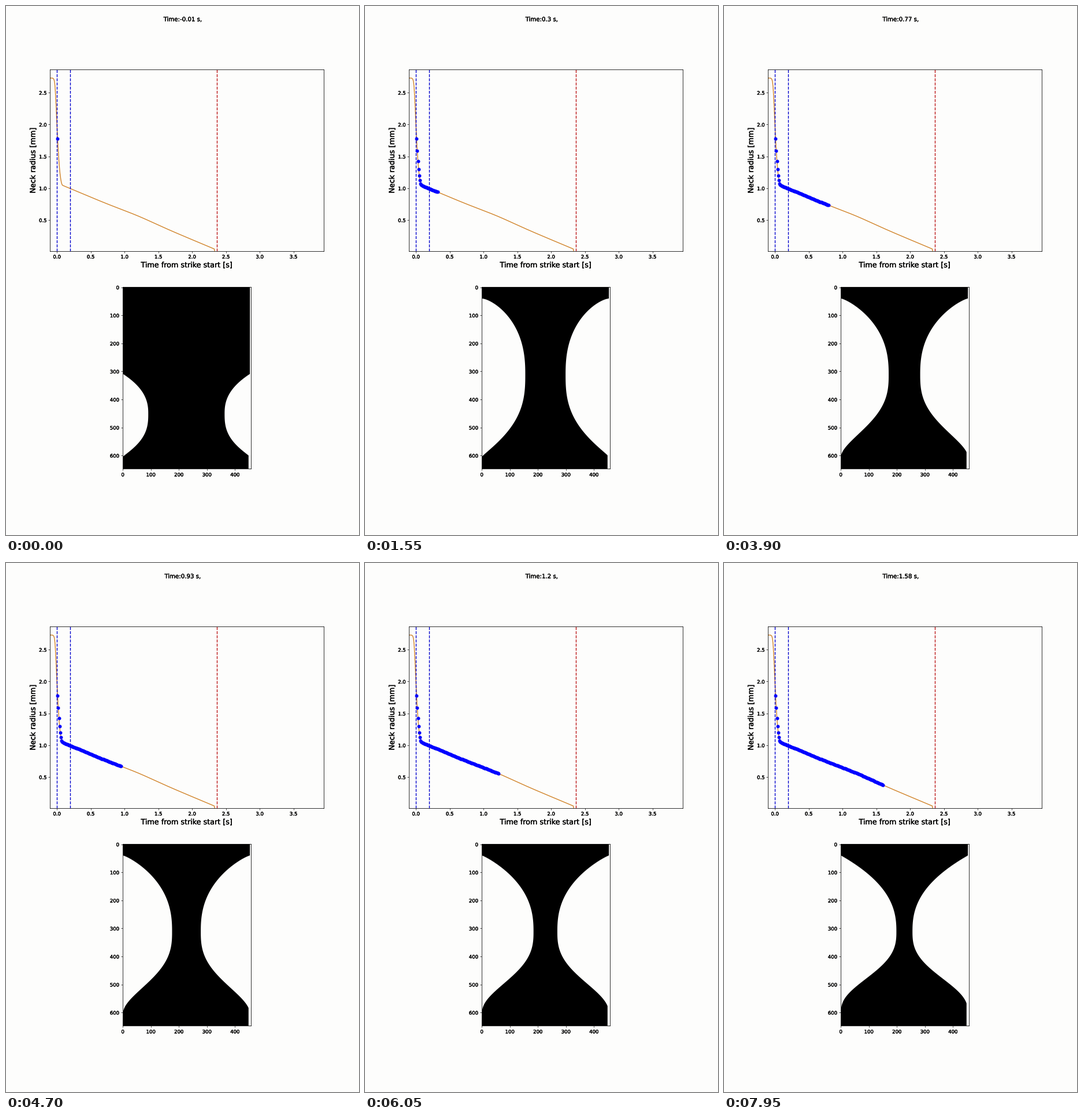
Recreate the animation shown at these times as a matplotlib script. Size 611x917 px, loop 8000 ms.

```python
import numpy as np
import matplotlib.pyplot as plt
from matplotlib.animation import FuncAnimation
from matplotlib.patheffects import withStroke
from matplotlib.text import Text

W, H, DPI = 611, 917, 61.1
FRAMES, STEP_MS = 160, 50
PAPER = "#fdfdfc"

# Lower view, in stage pixels
LEFT, RIGHT, TOP, BOTTOM = 201.9, 424.2, 487.4, 802.4
MID, FLOOR = 312.4, 781
SCALE = 0.4858          # stage pixels per view unit
MM = 37.1               # stage pixels per millimetre
NECK = 0.48             # neck height as a share of the gap

plt.rcParams["font.family"] = "DejaVu Sans"
plt.rcParams["axes.facecolor"] = PAPER
plt.rcParams["axes.linewidth"] = 0.95


def radius(t):
    """Plateau, fast collapse during the strike, then near-linear thinning."""
    thinning = 1.083 - 0.445 * t + 0.016 * np.exp(-((t - 1.2) / 0.35) ** 2)
    strike = 0.706 * (np.clip(0.088 - t, 0, None) / 0.078) ** 2.3
    return ((thinning + strike) ** -10 + 2.73 ** -10) ** -0.1


def flare(u, p, q):
    """Rises from 0 at the neck to 1 at the plate."""
    return 1 - (1 - u ** p) ** q


def outline(r):
    """Filament polygon in stage pixels for a neck radius."""
    gap = min(143 * (1.785 / r) ** 1.2, 274)
    s = np.linspace(0, 1, 300)
    y = FLOOR + (s - 1) * gap
    upper = flare(np.clip(1 - s / NECK, 0, 1), 2.4,
                  min(1, 0.68 + 0.57 * abs(r - 0.938)))
    lower = flare(np.clip((s - NECK) / (1 - NECK), 0, 1), 2.7,
                  1.12 + 3.57 * max(0, 0.938 - r))
    neck = MM * r
    half = neck + (MID - 202.5 - neck) * (upper + lower)
    left = np.r_[202.2, MID - half, 202.2]
    right = np.r_[422.4, np.where(s > NECK, np.minimum(MID + half, 420), MID + half), 420]
    y = np.r_[TOP, y, BOTTOM]
    return np.c_[np.r_[left, right[::-1]], np.r_[y, y[::-1]]]


def add_axes(left, top, right, bottom):
    return fig.add_axes([left / W, 1 - bottom / H, (right - left) / W, (bottom - top) / H])


fig = plt.figure(figsize=(W / DPI, H / DPI), dpi=DPI, facecolor=PAPER)
title = fig.suptitle("Time:-0.01 s,", fontsize=12)

plot = add_axes(76.4, 110.3, 549.9, 424.7)
plot.set(xlim=(-0.1, 3.947), ylim=(0.015, 2.862))
plot.set_xlabel("Time from strike start [s]", fontsize=15)
plot.set_ylabel("Neck radius [mm]", fontsize=15)

time = np.linspace(-0.1, 2.333, 500)
curve = radius(time)
curve[-1] = 0.015       # break-up
plot.plot(time, curve, color="#d2872f", lw=1.7)
for x, color in ((0, "#0000cc"), (0.194, "#0000cc"), (2.367, "#bb1414")):
    plot.axvline(x, color=color, ls="--", lw=1.6)
dots, = plot.plot([], [], "o", color="#0000ff", ms=6)

view = add_axes(LEFT, TOP, RIGHT, BOTTOM)
view.set(xlim=(-0.5, 457.5), ylim=(647.5, -0.5))
view.set_xticks(range(0, 401, 100))
view.set_yticks(range(0, 601, 100))
body, = view.fill([0, 1, 1], [0, 0, 1], color="black", lw=0)

# A thin outline keeps the small lettering dark
fig.canvas.draw()
for text in fig.findobj(Text):
    text.set_path_effects([withStroke(linewidth=0.45, foreground="black")])


def draw(i):
    title.set_text(f"Time:{round((i - 1) / 100, 2)} s,")
    t = 0.01 * np.arange(1, i + 2)
    dots.set_data(t, radius(t))
    body.set_xy((outline(radius(t[-1])) - (LEFT, TOP)) / SCALE - 0.5)
    return title, dots, body


anim = FuncAnimation(fig, draw, frames=FRAMES, interval=STEP_MS, repeat=True,
                     repeat_delay=0, blit=False)
plt.show()
```
